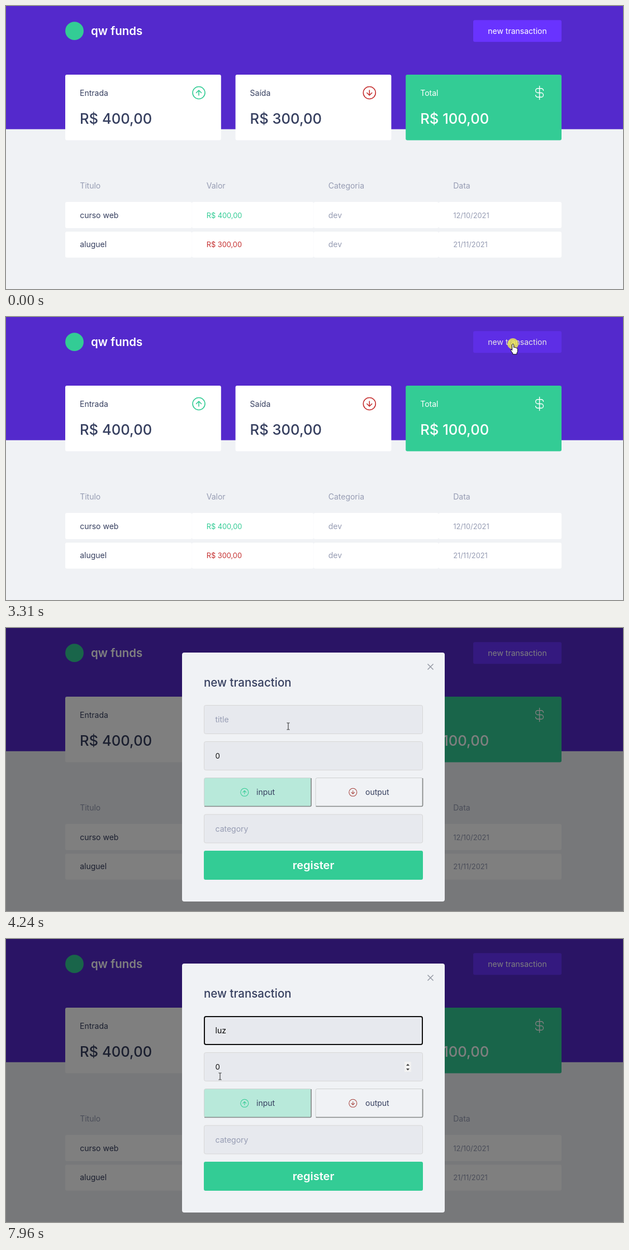
Animation of 1104 by 507 pixels, one loop 8 s. Source, as an HTML page:

```html
<!DOCTYPE html>
<html lang="pt-BR">
<head>
<meta charset="utf-8">
<title>Transactions</title>
<style>
  html, body { margin: 0; width: 100%; height: 100%; overflow: hidden; background: #f0f2f5; }
  svg { display: block; width: 1104px; height: 507px; font: 14px Inter, sans-serif; }
  text { white-space: pre; }
  .dark { fill: #363f5f; }
  .light { fill: #969cb3; }
  .white { fill: #fff; }
  .green { fill: #33cc95; }
  .red { fill: #c53030; }
  .amount { font-size: 25.6px; font-weight: 500; }
  .price { font-size: 12.8px; }
  .heading { font-size: 20.5px; font-weight: 600; }
  .field { fill: #e7e9ee; stroke: #d7d7d7; }
  .icon { fill: none; stroke-width: 1.6; stroke-linecap: round; stroke-linejoin: round; }
</style>
</head>
<body>
<svg viewBox="0 0 1104 507">
  <defs>
    <g id="arrowIcon" class="icon">
      <circle r="11"/>
      <path d="M0 4.5V-4.5M-4.5 0L0-4.5L4.5 0"/>
    </g>
  </defs>

  <rect width="1104" height="507" fill="#f0f2f5"/>
  <rect width="1104" height="220.7" fill="#5429cc"/>
  <circle cx="122.5" cy="44.7" r="16.4" fill="#33cc95"/>
  <text x="152" y="52" class="white heading">qw funds</text>
  <g id="newButton">
    <rect x="836" y="25.3" width="158" height="39" rx="3" fill="#6933ff"/>
    <text x="915" y="49.8" class="white" text-anchor="middle">new transaction</text>
  </g>

  <g id="cards"></g>
  <use href="#arrowIcon" x="345" y="155.5" stroke="#33cc95"/>
  <use href="#arrowIcon" transform="translate(650.3 155.5) rotate(180)" stroke="#c53030"/>
  <path class="icon" transform="translate(954.6 155.5)" stroke="#fff" style="stroke-width:1.4"
        d="M0-12V12M7-4.2A4.2 4.2 0 0 0 3-7.8H-3a3.9 3.9 0 0 0 0 7.8H3a3.9 3.9 0 0 1 0 7.8H-3A4.2 4.2 0 0 1-7 4.2"/>
  <g id="table"></g>

  <g id="modal">
    <rect width="1104" height="507" fill="#000" opacity=".5"/>
    <rect x="315" y="44" width="470" height="446" rx="4" fill="#f0f2f5"/>
    <path id="close" d="M754.5 64.5l10 10m0-10l-10 10" stroke="#969aa5" stroke-width="1.5"/>
    <text x="354" y="104.5" class="dark heading" style="font-weight:500">new transaction</text>

    <rect x="354.5" y="138.5" width="391" height="51" rx="3" class="field"/>
    <rect id="focus" x="355" y="139" width="390" height="50" rx="3" fill="none" stroke="#101010" stroke-width="2"/>
    <text id="title" x="374.5" y="169"></text>
    <path id="caret" d="M.5 155V174" stroke="#111"/>

    <rect x="354.5" y="203.5" width="391" height="51" rx="3" class="field"/>
    <text x="374.5" y="234" fill="#111" font-size="13.3">0</text>
    <g id="spinner">
      <rect x="713" y="220" width="12" height="18" fill="#f2f2f2"/>
      <path d="M716 227l3-3.5l3 3.5zM716 232l3 3.5l3-3.5z" fill="#444"/>
    </g>

    <g id="types"></g>
    <use href="#arrowIcon" transform="translate(426.8 294.3) scale(.64)" stroke="#33cc95"/>
    <use href="#arrowIcon" transform="translate(620.8 294.3) rotate(180) scale(.64)" stroke="#a5403a"/>

    <rect x="354.5" y="334" width="391" height="51" rx="3" class="field"/>
    <text x="374.5" y="364.5" class="light">category</text>
    <rect x="354" y="399" width="392" height="52" rx="3" fill="#33cc95"/>
    <text x="550" y="432" class="white heading" style="font-size:20px" text-anchor="middle">register</text>
  </g>

  <g id="pointer">
    <circle id="click" r="10" fill="#f3f34a" opacity=".8"/>
    <path id="arrow" d="M0 0V13.5L3.1 10.7L5.2 15.6L7.6 14.6L5.5 9.8H9.6Z" fill="#fff" stroke="#111" stroke-width=".9"/>
    <path id="hand" fill="#fff" stroke="#111" stroke-linejoin="round"
          d="M-1.5 1.2Q0-.6 1.5 1.2V6.5Q3.5 5.2 4 6.9Q6 6 6.3 7.8Q8.4 7.2 8.5 9.2V13Q8.5 15 7 16.4V18.8H-.2V17L-4 11.8Q-4.6 9.6-2.8 10.2L-1.5 11.7Z"/>
    <path id="beam" d="M-2.5-6H-.8L0-5.4L.8-6H2.5M0-5.4V5.4M-2.5 6H-.8L0 5.4L.8 6H2.5" fill="none" stroke="#222"/>
  </g>
</svg>

<script>
const $ = id => document.getElementById(id);
const label = (x, y, cls, text) => `<text x="${x}" y="${y}" class="${cls}">${text}</text>`;
const box = (x, y, w, h, fill) => `<rect x="${x}" y="${y}" width="${w}" height="${h}" rx="3" fill="${fill}"/>`;

$('cards').innerHTML = [
  [106, 'Entrada', 'R$ 400,00', '#fff', 'dark'],
  [410.6, 'Saída', 'R$ 300,00', '#fff', 'dark'],
  [715.2, 'Total', 'R$ 100,00', '#33cc95', 'white'],
].map(([x, name, amount, fill, cls]) =>
  box(x, 123, 278.8, 117.5, fill) +
  label(x + 26, 161, cls, name) +
  label(x + 26, 210.5, cls + ' amount', amount)).join('');

const columns = [106, 332.5, 550.5, 774, 994];
const row = (y, classes, cells) => cells.map((cell, i) => label(columns[i] + 26.2, y, classes[i], cell)).join('');
const cellBoxes = (y, h) => columns.slice(0, 4).map((x, i) => box(x, y, columns[i + 1] - x, h, '#fff')).join('');

$('table').innerHTML =
  row(326.5, Array(4).fill('light'), ['Titulo', 'Valor', 'Categoria', 'Data']) +
  cellBoxes(351, 47) +
  row(379.5, ['dark', 'green price', 'light', 'light price'], ['curso web', 'R$ 400,00', 'dev', '12/10/2021']) +
  cellBoxes(404.3, 46.4) +
  row(432, ['dark', 'red price', 'light', 'light price'], ['aluguel', 'R$ 300,00', 'dev', '21/11/2021']);

$('types').innerHTML = [
  [354, '#b8e9da', 448, 'input'],
  [553.5, '#f0f2f5', 643, 'output'],
].map(([x, fill, textX, name]) =>
  `<rect x="${x + .5}" y="268.5" width="192" height="51" rx="3" fill="${fill}" stroke="#cfd2d2"/>
   <path d="M${x + 1} 319.5H${x + 190}Q${x + 192} 319.5 ${x + 192} 317.5V269" fill="none" stroke="#858888" stroke-width="1.6"/>` +
  label(textX, 299, 'dark', name)).join('');

// Pointer moves: first step, last step, number of steps, destination.
const origin = [847, 551];
const moves = [
  [590, 800, 4, 939, 60],
  [950, 1160, 4, 882, 45],
  [1230, 1370, 3, 907, 48],
  [4100, 4240, 3, 505, 176],
  [4580, 4710, 3, 451, 175],
  [7500, 7960, 8, 383, 246],
];

function pointerAt(t) {
  let [x, y] = origin;
  for (const [start, end, steps, toX, toY] of moves) {
    if (t < start) break;
    const gap = (end - start) / (steps - 1);
    const done = Math.min(steps, Math.floor((t - start) / gap + 1.001)) / steps;
    x += (toX - x) * done;
    y += (toY - y) * done;
  }
  return [x, y];
}

// Field states: time, text, caret position (0 hides the caret).
const typing = [
  [0, '', 0], [4970, '', 375], [5520, '', 0], [6050, 'l', 378],
  [6310, 'lu', 386], [6840, 'lu', 0], [7100, 'luz', 393], [7630, 'luz', 0],
];

const show = (id, visible) => $(id).style.display = visible ? '' : 'none';
const within = (t, a, b) => t >= a && t < b;
const ramp = (t, a, b) => Math.min(1, Math.max(0, (t - a) / (b - a)));

function render(t) {
  const hover = ramp(t, 730, 930) - ramp(t, 3560, 3760);
  $('newButton').style.filter = hover ? `brightness(${1 - .1 * hover})` : 'none';

  show('modal', t >= 3510);
  show('close', t >= 3580);
  show('focus', t >= 4970);

  const [, text, caret] = typing.findLast(state => t >= state[0]);
  $('title').textContent = text || 'title';
  $('title').setAttribute('class', text ? '' : 'light');
  $('caret').setAttribute('transform', `translate(${caret - .5})`);
  show('caret', caret);

  const [x, y] = pointerAt(t);
  $('pointer').setAttribute('transform', `translate(${x} ${y})`);
  $('click').setAttribute('cx', t > 4000 ? -2 : 0);
  show('pointer', t >= 590);
  show('click', within(t, 3310, 3440) || within(t, 4970, 5120));
  show('hand', within(t, 800, 3440));
  show('beam', t >= 4240);
  show('arrow', t < 800 || within(t, 3440, 4240));
  show('spinner', t > 7500 && y > 203);
}

function frame() {
  render(performance.now() % 8000);
  requestAnimationFrame(frame);
}
frame();
</script>
</body>
</html>
```
